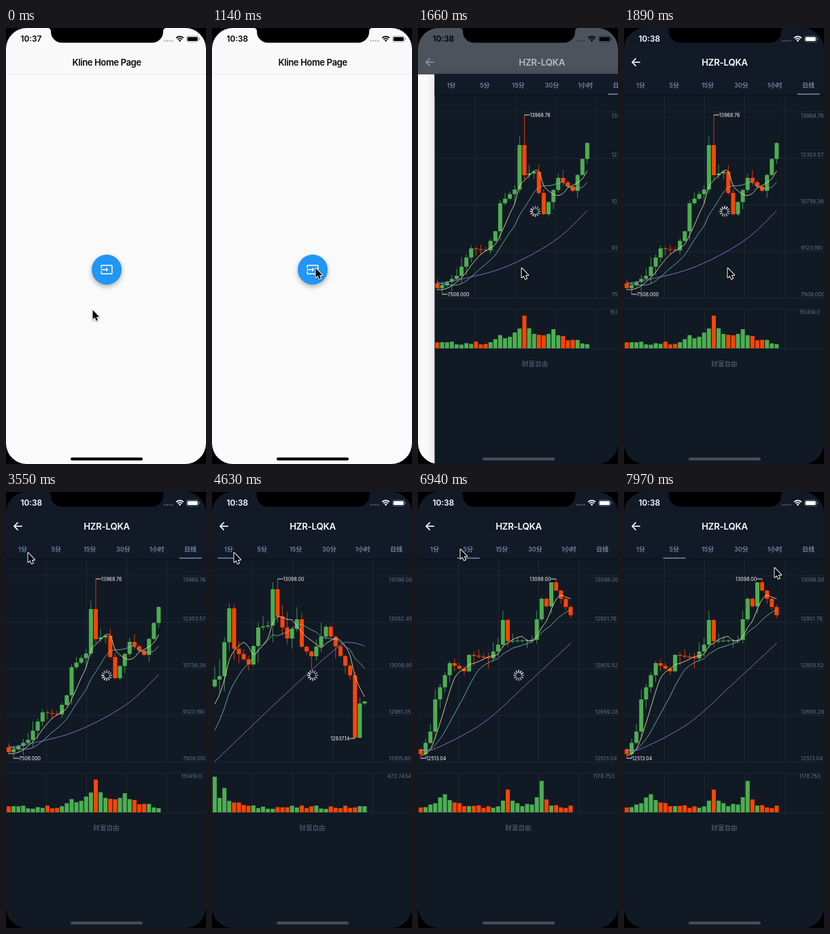
Write an HTML page with a canvas that moves like this. It is 294 px wide and 637 px high and loops after 7990 ms.

```html
<!DOCTYPE html>
<html lang="en">
<head>
<meta charset="utf-8">
<title>Kline</title>
<style>
html, body { margin: 0; width: 100%; height: 100%; overflow: hidden; background: #000; }
canvas { display: block; width: 294px; height: 637px; }
</style>
</head>
<body>
<canvas id="stage"></canvas>
<script>
const W = 294, H = 637, LOOP = 7990, BARS = 32, STEP = 7.11;
const canvas = document.getElementById('stage');
const ctx = canvas.getContext('2d');
const dpr = window.devicePixelRatio || 1;
canvas.width = W * dpr;
canvas.height = H * dpr;

const SANS = 'Inter, Roboto, "Noto Sans CJK SC", "Noto Sans CJK", sans-serif';
const PAGE = '#111925', GREEN = '#4caf50', RED = '#ff4500', TAB = '#6f83a3', LABEL = '#62738a';
const TABS = ['1分', '5分', '15分', '30分', '1小时', '日线'];
const PAIR = 'HZR-LQKA';

const clamp = v => Math.max(0, Math.min(1, v));
const span = (t, a, b) => clamp((t - a) / (b - a));
const smooth = v => v * v * (3 - 2 * v);
const lerp = (a, b, k) => a + (b - a) * k;
const mix = (a, b, k) => `rgb(${a.map((v, i) => Math.round(lerp(v, b[i], k)))})`;
const candleX = i => 4 + i * STEP;
const noise = n => {
  const v = Math.sin(n * 12.9898) * 43758.5453;
  return v - Math.floor(v);
};

// Straight path through [bar, height] turning points
function along(points, i) {
  const n = Math.max(1, points.findIndex(p => p[0] >= i));
  const [a, b] = [points[n - 1], points[n]];
  return lerp(a[1], b[1], (i - a[0]) / (b[0] - a[0]));
}

// Moving average; bars before the first follow a line that fits both starting values
function average(close, fast, mid, n) {
  const near = (5 * fast - close[0]) / 4;
  const far = (10 * mid - close[0] - 4 * near) / 5;
  const value = i => i >= 0 ? close[i] : near + (far - near) * (-2.5 - i) / 4.5;
  return close.map((_, i) => {
    let sum = 0;
    for (let k = 0; k < n; k++) sum += value(i - k);
    return [candleX(i), sum / n];
  });
}

// Grows candles, volumes and averages from the turning points of a series
function series({ seed, open, turns, top, bottom, wick, bursts, fast, mid, slow, range, volume, low }) {
  const close = Array.from({ length: BARS }, (_, i) => along(turns, i));
  const candles = close.map((c, i) => {
    const o = i ? close[i - 1] : open;
    const reach = k => 1 + wick * noise(seed + i * 2 + k) ** 1.6;
    const swell = bursts.reduce((s, [at, size, wide]) => s + size * Math.exp(-Math.abs(i - at) / wide), 0);
    return {
      o, c,
      hi: i === top[0] ? top[1] : Math.max(top[1] + 5, Math.min(o, c) - reach(0)),
      lo: i === bottom[0] ? bottom[1] : Math.min(bottom[1], Math.max(o, c) + reach(1)),
      vol: 5 + 5 * noise(seed + i + 90) + swell
    };
  });
  const [min, max] = range;
  return {
    candles, top, bottom,
    fast: average(close, fast, mid, 5),
    mid: average(close, fast, mid, 10),
    slow: slow.map(([i, y]) => [candleX(i), y]),
    axis: [0, 1, 2, 3, 4].map(i => lerp(max, min, i / 4).toPrecision(7)),
    topLabel: max.toFixed(2),
    bottomLabel: low || min.toPrecision(7),
    volume: volume.toPrecision(7)
  };
}

const day = series({
  seed: 3, open: 373, wick: 13, top: [18, 127], bottom: [1, 389],
  turns: [[0, 380], [4, 362], [7, 322], [10, 325], [12, 297], [13, 256], [16, 236], [17, 171],
    [18, 215], [20, 210], [22, 272], [25, 219], [28, 238], [31, 168]],
  bursts: [[18, 38, 1.8], [24, 17, 2.5], [13, 10, 0.7]],
  fast: 382, mid: 371, slow: [[0, 374], [13, 352], [24, 312], [31, 267]],
  range: [7508, 13968.76], volume: 151419
});
const minute = series({
  seed: 11, open: 284, wick: 24, top: [13, 127], bottom: [29, 360],
  turns: [[0, 274], [1, 269], [3, 170], [4, 229], [7, 252], [9, 198], [11, 195], [12, 142], [13, 182],
    [15, 214], [17, 186], [18, 226], [20, 240], [23, 197], [28, 268], [29, 359], [30, 309], [31, 306]],
  bursts: [[0, 40, 0.6], [2, 28, 0.8], [5, 7, 1]],
  fast: 310, mid: 348, slow: [[0, 394], [13, 306], [25, 229], [28, 220], [31, 225]],
  range: [12915.8, 13098], volume: 472.7434, low: '12937.14'
});
const five = series({
  seed: 7, open: 376, wick: 14, top: [28, 127], bottom: [0, 389],
  turns: [[0, 383], [2, 350], [3, 303], [6, 250], [9, 262], [10, 238], [14, 243], [16, 223],
    [17, 187], [18, 218], [23, 216], [25, 156], [26, 167], [27, 132], [31, 180]],
  bursts: [[5, 21, 1.8], [18, 26, 1], [25, 36, 1]],
  fast: 385, mid: 377, slow: [[0, 376], [3, 375], [13, 337], [22, 280], [31, 221]],
  range: [12513.04, 13098], volume: 1178.753
});

function bezier(x1, y1, x2, y2) {
  const at = (a, b, s) => 3 * (1 - s) * (1 - s) * s * a + 3 * (1 - s) * s * s * b + s * s * s;
  return x => {
    let lo = 0, hi = 1;
    for (let i = 0; i < 24; i++) {
      const m = (lo + hi) / 2;
      if (at(x1, x2, m) < x) lo = m; else hi = m;
    }
    return at(y1, y2, lo);
  };
}
const slideEase = bezier(0.35, 0.91, 0.33, 0.97);
const tabEase = bezier(0.25, 0.1, 0.25, 1);

function rect(x, y, w, h, color) {
  ctx.fillStyle = color;
  ctx.fillRect(x, y, w, h);
}
function disc(x, y, r, color) {
  ctx.fillStyle = color;
  ctx.beginPath();
  ctx.arc(x, y, r, 0, 7);
  ctx.fill();
}
function pill(x, y, w, h, r, color) {
  ctx.fillStyle = color;
  ctx.beginPath();
  ctx.roundRect(x, y, w, h, r);
  ctx.fill();
}
function text(str, x, y, size, color, { align = 'left', weight = 400, gap = 0 } = {}) {
  ctx.font = `${weight} ${size}px ${SANS}`;
  ctx.letterSpacing = gap + 'px';
  ctx.textAlign = align;
  ctx.textBaseline = 'alphabetic';
  ctx.fillStyle = color;
  ctx.fillText(str, x, y + size * 0.36);
}
function line(points, color, width) {
  ctx.strokeStyle = color;
  ctx.lineWidth = width;
  ctx.beginPath();
  points.forEach(([x, y]) => ctx.lineTo(x, y));
  ctx.stroke();
}
function curve(points, color) {
  ctx.strokeStyle = color;
  ctx.lineWidth = 0.9;
  ctx.beginPath();
  ctx.moveTo(...points[0]);
  for (let i = 1; i < points.length; i++) {
    const a = points[Math.max(0, i - 2)], b = points[i - 1], c = points[i];
    const d = points[Math.min(points.length - 1, i + 1)];
    ctx.bezierCurveTo(b[0] + (c[0] - a[0]) / 6, b[1] + (c[1] - a[1]) / 6,
      c[0] - (d[0] - b[0]) / 6, c[1] - (d[1] - b[1]) / 6, c[0], c[1]);
  }
  ctx.stroke();
}

function mark([i, y], label) {
  const x = candleX(i), dir = x < W / 2 ? 1 : -1;
  line([[x, y], [x + 8 * dir, y]], '#fff', 0.9);
  text(label, x + 8 * dir, y, 7.06, '#fff', { align: dir > 0 ? 'left' : 'right' });
}

function drawGrid() {
  const color = '#1b2833';
  for (let i = 1; i < 5; i++) {
    rect(i * 59, 99, 1, 295, color);
    rect(i * 59, 410, 1, 58, color);
  }
  for (let i = 0; i < 5; i++) rect(0, 122 + i * 68, W, 1, color);
  rect(0, 410, W, 1, color);
  rect(0, 468, W, 1, color);
}

function drawChart(set) {
  set.candles.forEach(({ o, c, hi, lo, vol }, i) => {
    const color = c <= o ? GREEN : RED, x = candleX(i);
    rect(x - 0.4, hi, 0.8, lo - hi, color);
    rect(x - 3, Math.min(o, c), 6, Math.max(1, Math.abs(o - c)), color);
    rect(x - 3, 468 - vol, 6, vol, color);
  });
  curve(set.fast, '#e9dba6');
  curve(set.mid, '#74b9a5');
  curve(set.slow, '#9678cf');
  mark(set.top, set.topLabel);
  mark(set.bottom, set.bottomLabel);
  set.axis.forEach((s, i) => text(s, 260, i ? 117.5 + i * 68 : 128, 7.84, LABEL));
  text(set.volume, 257.5, 415.5, 7.84, LABEL);
  text('财富自由', 147.5, 491, 9.6, '#566a80', { align: 'center' });
}

function drawSpinner(t) {
  const head = Math.floor(t / 83.3);
  ctx.lineCap = 'round';
  for (let i = 0; i < 12; i++) {
    const a = i * Math.PI / 6, age = (head - i + 1200) % 12;
    const at = r => [148 + r * Math.cos(a), 268 + r * Math.sin(a)];
    ctx.globalAlpha = Math.max(0.6, 1 - age * 0.06);
    line([at(4.3), at(7.4)], '#fff', 1.5);
  }
  ctx.globalAlpha = 1;
  ctx.lineCap = 'butt';
}

const enterIcon = new Path2D('M21 3H3c-1.1 0-2 .9-2 2V9h2V5h18v14H3V15H1v4c0 1.1.9 2 2 2h18c1.1 0 2-.9 2-2v-14c0-1.1-.9-2-2-2zM11 16l4-4-4-4v3H1v2h10v3z');

function drawHome(t, shift) {
  const press = smooth(span(t, 1140, 1400));
  rect(0, 67, W, H - 67, '#fafafa');
  ctx.save();
  ctx.translate(148 - shift, 353);
  if (press) disc(0.5, 7, lerp(22, 30, press), `rgba(0,0,0,${0.035 * press})`);
  ctx.shadowColor = 'rgba(0,0,0,.3)';
  ctx.shadowBlur = lerp(7, 11, press) * dpr;
  ctx.shadowOffsetY = lerp(3, 5, press) * dpr;
  disc(0, 0, 22, mix([33, 150, 243], [113, 172, 217], press));
  ctx.shadowColor = 'transparent';
  ctx.scale(0.784, 0.784);
  ctx.translate(-12, -12);
  ctx.fillStyle = '#fff';
  ctx.fill(enterIcon);
  ctx.restore();
}

function drawPage(t, off) {
  ctx.save();
  ctx.translate(off, 0);
  if (off > 0) {
    ctx.shadowColor = 'rgba(0,0,0,.16)';
    ctx.shadowBlur = 15 * dpr;
  }
  rect(0, 67, W, H - 67, PAGE);
  ctx.shadowColor = 'transparent';
  rect(0, 67, W, 31, '#121a28');
  rect(0, 97.5, W, 1.5, '#0c131d');
  TABS.forEach((s, i) => text(s, 24.5 + i * 49.3, 83.5, 9, TAB, { align: 'center', weight: 600 }));
  const tab = 5 - 5 * tabEase(span(t, 3580, 3880)) + tabEase(span(t, 6080, 6380));
  rect(8.2 + tab * 49.3, 95.8, 33, 1.6, '#7689a8');
  drawGrid();
  if (t >= 1600) drawChart(t < 4520 ? day : t < 6910 ? minute : five);
  if ((t >= 1600 && t < 4970) || (t >= 6080 && t < 7000)) drawSpinner(t);
  ctx.restore();
}

function drawBar(off, k) {
  rect(0, 0, W, 67, mix([249, 249, 249], [18, 26, 40], k));
  rect(0, 67, W, 0.8, mix([228, 228, 228], [13, 20, 30], k));
  ctx.globalAlpha = clamp(1 - 3 * k);
  text('Kline Home Page', 148, 50, 13.1, '#0a0a0a', { align: 'center', weight: 600, gap: -0.42 });
  ctx.globalAlpha = span(k, 0.35, 1);
  text(PAIR, 148 + off * 1.4, 50, 13.2, '#fff', { align: 'center', weight: 600, gap: -0.2 });
  ctx.globalAlpha = span(k, 0.6, 1);
  line([[23.8, 50], [12.5, 50]], '#fff', 1.6);
  line([[17.6, 44.4], [12, 50], [17.6, 55.6]], '#fff', 1.6);
  ctx.globalAlpha = 1;
}

function drawStatus(t) {
  const color = t < 1700 ? '#000' : '#fff';
  text(t < 600 ? '10:37' : '10:38', 21.5, 16, 11.8, color, { weight: 600 });
  ctx.globalAlpha = 0.28;
  for (let i = 0; i < 4; i++) disc(233.5 + i * 3.6, 18.8, 1.2, color);
  ctx.globalAlpha = 1;
  ctx.strokeStyle = color;
  ctx.lineWidth = 1.7;
  for (const r of [4.6, 7.6]) {
    ctx.beginPath();
    ctx.arc(255.5, 20, r, -Math.PI * 0.75, -Math.PI * 0.25);
    ctx.stroke();
  }
  ctx.fillStyle = color;
  ctx.beginPath();
  ctx.moveTo(255.5, 20.2);
  ctx.arc(255.5, 20, 2.7, -Math.PI * 0.75, -Math.PI * 0.25);
  ctx.fill();
  ctx.globalAlpha = 0.4;
  ctx.lineWidth = 0.8;
  ctx.beginPath();
  ctx.roundRect(265.4, 11.9, 17.6, 8.4, 2.4);
  ctx.stroke();
  pill(283.8, 14.6, 1.1, 3, 0.5, color);
  ctx.globalAlpha = 1;
  pill(266.7, 13.2, 15, 5.8, 1.3, color);
}

function drawFrame(t) {
  pill(95, 627.6, 106, 4.2, 2.1, t < 1600 ? '#000' : '#4b4d50');
  ctx.fillStyle = '#000';
  ctx.beginPath();
  ctx.rect(0, 0, W, H);
  ctx.roundRect(0, 0, W, H, 30.5);
  ctx.fill('evenodd');
  ctx.beginPath();
  ctx.moveTo(61, 0);
  ctx.quadraticCurveTo(66, 0, 66, 5);
  ctx.arcTo(66, 21.5, 82, 21.5, 16);
  ctx.arcTo(231, 21.5, 231, 5, 16);
  ctx.lineTo(231, 5);
  ctx.quadraticCurveTo(231, 0, 236, 0);
  ctx.fill();
}

function cursorAt(t) {
  const go = (a, b, k) => [lerp(a[0], b[0], k), lerp(a[1], b[1], k)];
  const rest = [127, 411], button = [152, 350], first = [32, 88], second = [62, 83];
  if (t < 2660) return go(rest, button, smooth(span(t, 420, 730)));
  if (t < 5630) return go(button, first, smooth(span(t, 2660, 3410)));
  if (t < 7630) return go(first, second, smooth(span(t, 5630, 5850)));
  const k = smooth(span(t, 7630, 7970)), bend = [150, 170];
  return go(go(second, bend, k), go(bend, [221, 110], k), k);
}

function drawCursor(t) {
  const [x, y] = cursorAt(t);
  ctx.save();
  ctx.translate(x + 0.5, y + 0.9);
  ctx.beginPath();
  [[0, 0], [0, 13.6], [3.1, 10.8], [5.2, 15.8], [7.4, 14.9], [5.3, 10], [9.6, 10]]
    .forEach(p => ctx.lineTo(...p));
  ctx.closePath();
  ctx.lineJoin = 'round';
  ctx.strokeStyle = '#fff';
  ctx.lineWidth = 2;
  ctx.shadowColor = 'rgba(0,0,0,.35)';
  ctx.shadowBlur = 2 * dpr;
  ctx.shadowOffsetY = dpr;
  ctx.stroke();
  ctx.shadowColor = 'transparent';
  ctx.fillStyle = '#000';
  ctx.fill();
  ctx.restore();
}

function render(t) {
  ctx.setTransform(dpr, 0, 0, dpr, 0, 0);
  const run = span(t, 1501, 1825);
  const shown = run >= 1 ? 1 : run <= 0 ? 0 : slideEase(run);
  const off = W * (1 - shown);
  if (shown < 1) drawHome(t, shown * W / 3);
  drawBar(off, smooth(clamp(run * 1.5 - 0.07)));
  if (shown > 0) drawPage(t, off);
  drawStatus(t);
  drawFrame(t);
  drawCursor(t);
}

const start = performance.now();
function tick() {
  render((performance.now() - start) % LOOP);
  requestAnimationFrame(tick);
}
tick();
</script>
</body>
</html>
```
